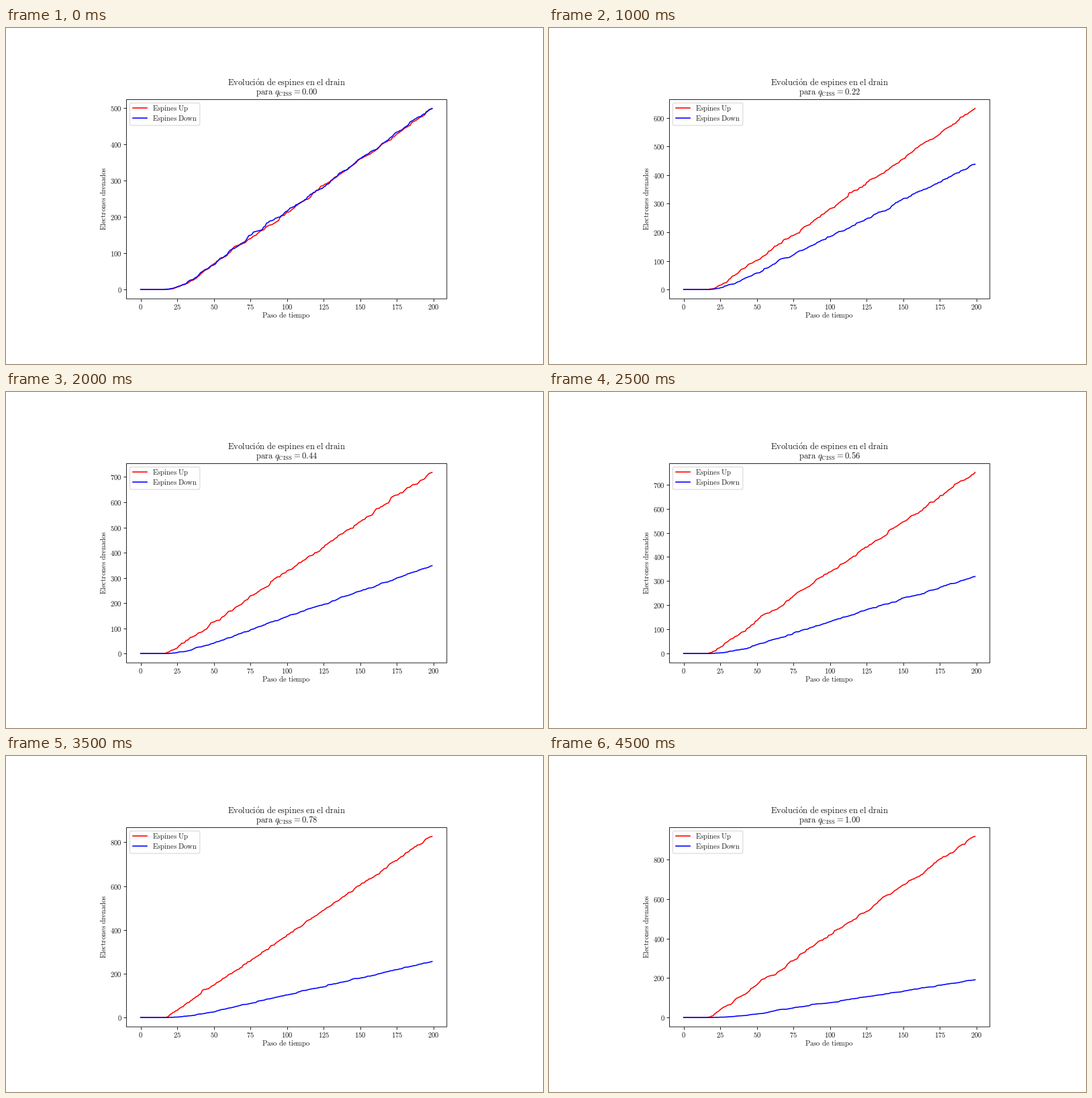
A matplotlib script that plays this animation: 800 by 500 pixels, repeating every 5000 ms.

```python
import numpy as np
import matplotlib.pyplot as plt
from matplotlib.animation import FuncAnimation
from matplotlib.patches import FancyBboxPatch, Rectangle

W, H = 800, 500
S = 0.77                      # chart scale inside the stage
SMALL, LARGE = 10 * S, 11.8 * S
FRAMES, STEPS = 10, 200
RED, BLUE, INK = "red", "blue", "0.1"

plt.rcParams["mathtext.fontset"] = "cm"

# Electrons drained by the last step, one value per frame
UP_TOTAL = [497, 565, 633, 619, 718, 750, 783, 827, 872, 917]
DOWN_TOTAL = [498, 468, 438, 407, 348, 319, 290, 256, 223, 191]

steps = np.arange(STEPS)


def drain(total, onset, rng, start=15, block=12):
    """Flow grows from zero to a steady rate, with jitter that evens out per block."""
    rate = np.clip((steps - start) / (2 * (onset - start)), 0, 1)
    smooth = np.cumsum(rate)
    noisy = rate * rng.gamma(2.5, size=STEPS)
    for i in range(0, STEPS, block):
        part = slice(i, i + block)
        noisy[part] *= rate[part].sum() / max(noisy[part].sum(), 1e-9)
    return np.round(total * np.cumsum(noisy) / smooth[-1])


def make_curves(k):
    q = k / (FRAMES - 1)
    rng = np.random.default_rng(40 + k)
    return (drain(UP_TOTAL[k], 17.5 + 9.5 * np.exp(-4 * q), rng),
            drain(DOWN_TOTAL[k], 26 + 8.5 * q, rng))


def rm(s):
    s = s.replace("ó", r"\acute{o}").replace(" ", r"\ ")
    return r"$\mathrm{" + s + "}$"


def heading(k):
    return (r"$\mathrm{para\ }q_{\mathrm{CISS}} = "
            + f"{k / (FRAMES - 1):.2f}$")


CURVES = [make_curves(k) for k in range(FRAMES)]

fig = plt.figure(figsize=(W / 100, H / 100), dpi=100, facecolor="white")

left, right, top, bottom = 179, 656.4, 106.2, 402.65
ax = fig.add_axes([left / W, 1 - bottom / H, (right - left) / W, (bottom - top) / H])
ax.set_xlim(-9.95, 208.95)
ax.tick_params(labelsize=SMALL, labelcolor=INK, length=3.5 * S,
               width=0.8 * S, pad=2.6 * S)
for axis in (ax.xaxis, ax.yaxis):
    axis.set_major_formatter(lambda v, _: f"${v:.0f}$")
ax.spines[:].set_visible(False)
lines = [ax.plot(steps, 0 * steps, color=c, lw=1.5 * S)[0] for c in (RED, BLUE)]

# Pixel-space layer for frame, labels and legend
pix = fig.add_axes([0, 0, 1, 1], zorder=3)
pix.set_xlim(0, W)
pix.set_ylim(H, 0)
pix.axis("off")


def label(x, y, s, size=SMALL, ha="center", rot=0):
    return pix.text(x, y, s, fontsize=size, ha=ha, va="baseline", color=INK,
                    rotation=rot, rotation_mode="anchor")


pix.add_patch(Rectangle((left + 0.4, top + 0.4), right - left, bottom - top,
                        fill=False, ec="black", lw=0.8 * S, snap=False))

mid = (left + right) / 2
label(mid, 86.2, rm("Evolución de espines en el drain"), LARGE)
title = label(mid, 99.3, heading(0), LARGE)
label(mid - 0.5, 431.3, rm("Paso de tiempo"))
label(148.6, (top + bottom) / 2 - 1, rm("Electrones drenados"), rot=90)

pix.add_patch(FancyBboxPatch((184.4, 111.6), 104.4, 33.4,
                             boxstyle="round,pad=0,rounding_size=2.1",
                             fc=(1, 1, 1, 0.8), ec=(0.8, 0.8, 0.8, 0.8), lw=S))
for y, color, name in ((119.4, RED, "Espines Up"), (134.3, BLUE, "Espines Down")):
    pix.plot([188.7, 210.1], [y, y], color=color, lw=1.5 * S)
    label(218.4, y + 3.8, rm(name), ha="left")


def update(k):
    for line, ys in zip(lines, CURVES[k]):
        line.set_ydata(ys)
    peak = max(ys[-1] for ys in CURVES[k])
    ax.set_ylim(-0.05 * peak, 1.05 * peak)
    title.set_text(heading(k))
    return lines + [title]


anim = FuncAnimation(fig, update, frames=FRAMES, interval=500,
                     init_func=lambda: update(0), repeat=True, repeat_delay=0)
plt.show()
```
